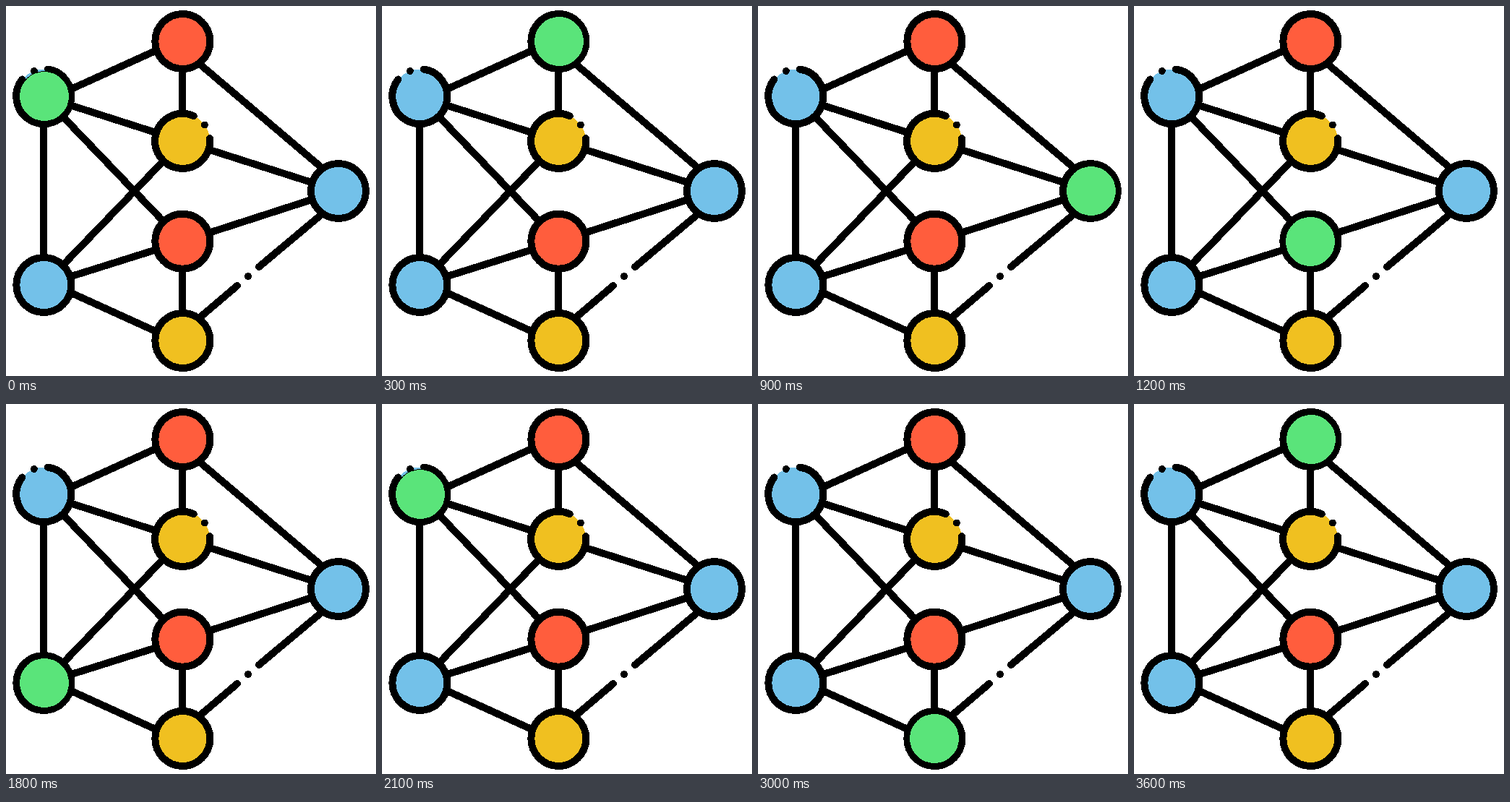
An HTML page that plays this animation: 512x512 px, repeating every 3900 ms.

```html
<!DOCTYPE html>
<html lang="en">
<head>
<meta charset="utf-8">
<title>Network</title>
<style>
  html, body { margin: 0; width: 100%; height: 100%; overflow: hidden; background: #fff; }
  svg { display: block; width: 100%; height: 100%; shape-rendering: crispEdges; }
</style>
</head>
<body>
<svg id="stage" viewBox="0 0 512 512"></svg>
<script>
const STEP = 300;
const RING = 38;
const RED = '#ff5d3d', YELLOW = '#f0c020', BLUE = '#73c1e9', GREEN = '#5ae47a';
const stage = document.getElementById('stage');

// gap: end points of an open ring (clockwise) and the dot between them
const nodes = {
  leftTop: { x: 52.3, y: 125.5, fill: BLUE, lit: [53, 125], gap: [58, 87.5, 22.5, 101.5, 38.8, 90] },
  leftBottom: { x: 52.3, y: 386, fill: BLUE, lit: [53, 386] },
  mid1: { x: 244.3, y: 49, fill: RED, lit: [245, 49] },
  mid2: { x: 244.3, y: 187, fill: YELLOW, lit: [245, 187], gap: [282, 183, 259.8, 152.2, 274.8, 164.5] },
  mid3: { x: 244.3, y: 325.7, fill: RED, lit: [244, 326] },
  mid4: { x: 244.3, y: 463, fill: YELLOW, lit: [244, 463] },
  right: { x: 460, y: 256, fill: BLUE, lit: [461, 256] }
};

const route = ['leftTop', 'mid1', 'mid2', 'right', 'mid3', 'mid4', 'leftBottom',
  'leftTop', 'mid3', 'leftBottom', 'mid4', 'right', 'mid1'];

function add(tag, attrs) {
  const el = document.createElementNS('http://www.w3.org/2000/svg', tag);
  for (const key in attrs) el.setAttribute(key, attrs[key]);
  return stage.appendChild(el);
}
const stroke = d => add('path', {
  d, fill: 'none', stroke: '#000', 'stroke-width': 10, 'stroke-linecap': 'round'
});
const disc = (cx, cy, r, fill) => add('circle', { cx, cy, r, fill });

// links that aim at node centres
for (const [from, to] of [
  ['leftTop', 'leftBottom'], ['leftTop', 'mid2'], ['leftTop', 'mid3'],
  ['leftBottom', 'mid2'], ['leftBottom', 'mid3'], ['mid1', 'mid2'],
  ['mid3', 'mid4'], ['mid2', 'right'], ['mid3', 'right']
]) {
  const a = nodes[from], b = nodes[to];
  stroke(`M${a.x} ${a.y}L${b.x} ${b.y}`);
}

// outer links
stroke('M89 115.5L208 61.5M89 396.5L208 450.5');
stroke('M270 82L436 223M270 429.5L320 387M350 361L436 289');
disc(335, 374, 5, '#000');

for (const { x, y, fill, gap } of Object.values(nodes)) {
  disc(x, y, RING, fill);
  if (gap) {
    const [x1, y1, x2, y2, dotX, dotY] = gap;
    stroke(`M${x1} ${y1}A${RING} ${RING} 0 1 1 ${x2} ${y2}`);
    disc(dotX, dotY, 5, '#000');
  } else {
    add('circle', { cx: x, cy: y, r: RING, fill: 'none', stroke: '#000', 'stroke-width': 10 });
  }
}

const rim = disc(0, 0, 35, '#000');
const light = disc(0, 0, 34, GREEN);

function draw(time) {
  const [x, y] = nodes[route[Math.floor(time / STEP) % route.length]].lit;
  for (const part of [rim, light]) {
    part.setAttribute('cx', x);
    part.setAttribute('cy', y);
  }
}

let start = null;
function tick(now) {
  if (start === null) start = now;
  draw(now - start);
  requestAnimationFrame(tick);
}
draw(0);
requestAnimationFrame(tick);
</script>
</body>
</html>
```
